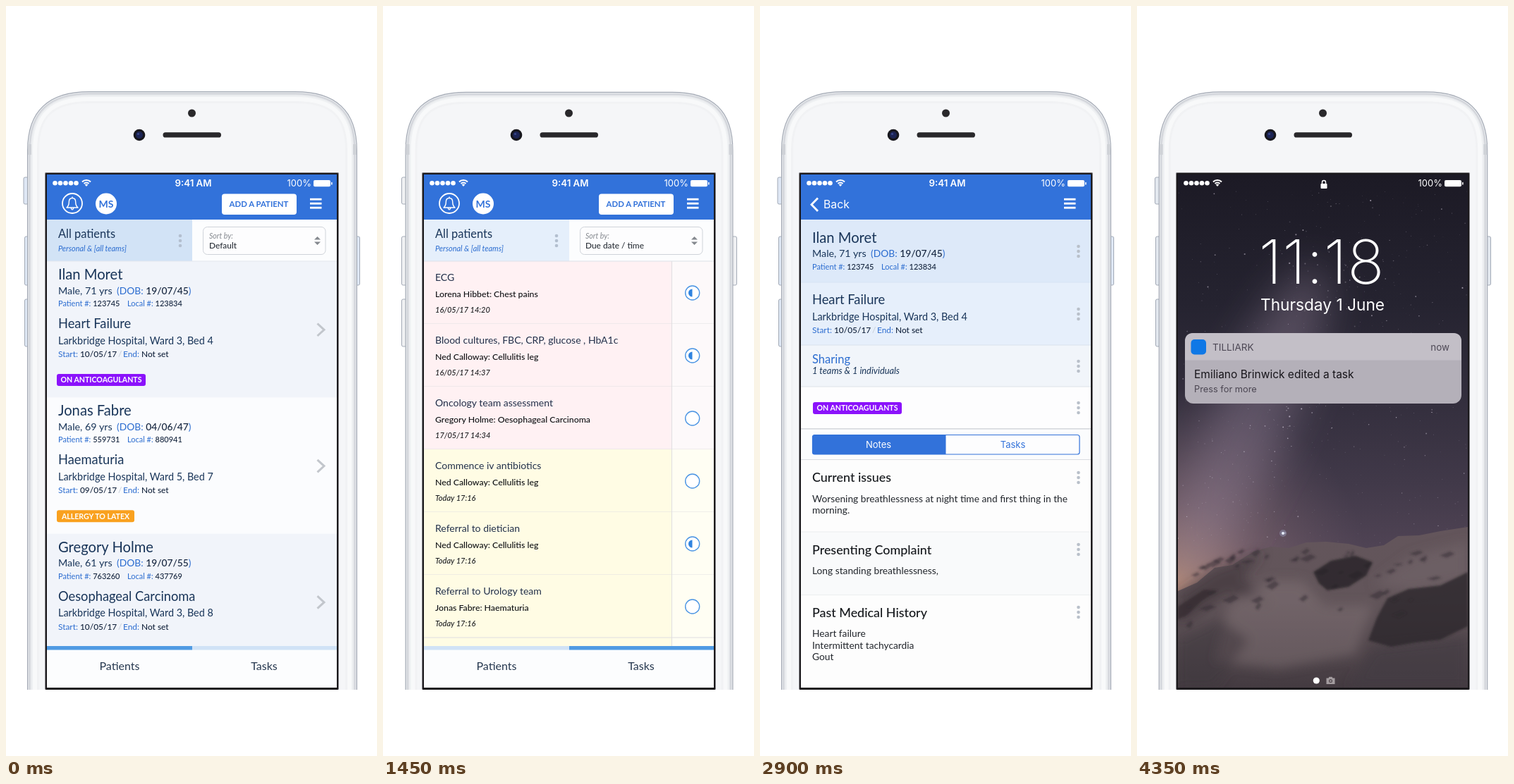
An HTML page that plays this animation: 526x1064 px, repeating every 5800 ms.

```html
<!DOCTYPE html>
<html lang="en">
<head>
<meta charset="utf-8">
<style>
html, body { margin: 0; width: 100%; height: 100%; overflow: hidden; background: #fff; }
svg { display: block; width: 526px; height: 1064px; font-family: Lato, "Open Sans", sans-serif; white-space: pre; }
.ui { font-family: Inter, Roboto, sans-serif; }
.it { font-style: italic; }
</style>
</head>
<body>
<svg id="stage" viewBox="0 0 526 1064"></svg>
<script>
const BLUE = '#3272da', NAVY = '#193559', INK = '#22262c', LINK = '#2c6dd0', SKY = '#4a94e3';
const STEP = 1450;

// Drawing helpers, each returning SVG markup
const rect = (x, y, w, h, fill, more = '') => `<rect x="${x}" y="${y}" width="${w}" height="${h}" fill="${fill}" ${more}/>`;
const dot = (x, y, r, fill, more = '') => `<circle cx="${x}" cy="${y}" r="${r}" fill="${fill}" ${more}/>`;
const path = (d, fill, more = '') => `<path d="${d}" fill="${fill}" ${more}/>`;
const line = (d, stroke, width, more = '') => path(d, 'none', `stroke="${stroke}" stroke-width="${width}" ${more}`);
const text = (x, y, size, fill, str, more = '') => `<text x="${x}" y="${y}" font-size="${size}" fill="${fill}" ${more}>${str}</text>`;
const group = (x, y, body) => `<g transform="translate(${x} ${y})">${body}</g>`;
const value = str => `<tspan fill="#14243d" font-weight="500">${str}</tspan>`;
const mid = 'text-anchor="middle"', bold = 'font-weight="700"', medium = 'font-weight="500"', ui = 'class="ui"', it = 'class="it"';
const more = (x, y, fill = '#b9c0ca') => [-7, 0, 7].map(d => dot(x, y + d, 2.3, fill)).join('');
const rule = (y, fill = '#dde1e8') => rect(58, y, 411, 1, fill);

function random(seed) {
  return () => (seed = seed * 16807 % 2147483647) / 2147483647;
}

function phone(inset, buttonX, tint) {
  const shell = i => {
    const l = 30 + inset + i, r = 498 - inset - i, t = 121 + inset / 2 + i;
    return `M${l} 970V205C${l} ${148 + i / 2} ${60 + i / 2} ${t} 118 ${t}H410C${468 - i / 2} ${t} ${r} ${148 + i / 2} ${r} 205V970Z`;
  };
  const button = (x, y, h) => rect(x, y, 9, h, tint, 'rx="2" stroke="#9aa2af" stroke-width=".9"');
  const shades = [[0, '#a3a9b4'], [1.2, '#e9ebee'], [2.5, '#cfd2d8'], [4, '#dfe1e5'], [5.5, '#eef0f2'], [8, '#f8f9fa'], [14, '#f1f2f4'], [17, '#f5f6f8']];
  return button(buttonX, 243, 38) + button(26.5, 327, 69) + button(26.5, 416, 67) + button(492.5, 327, 69)
    + shades.map(([i, fill]) => path(shell(i), fill)).join('')
    + rect(31 + inset, 196, 5, 15, '#cfd2d7') + rect(492 - inset, 196, 5, 15, '#cfd2d7')
    + dot(263.5, 152, 5.5, '#29282b')
    + dot(189, 183, 8.3, '#17171d') + dot(189, 183, 5, '#1c2455') + dot(187.5, 181.5, 1.6, '#39488b')
    + rect(222.5, 179.3, 82.5, 7.2, '#29282b', 'rx="3.6"')
    + rect(55, 236, 417, 734, '#8b8a8e', 'rx="1.5"') + rect(56, 237, 415, 733, '#1b191c', 'rx="1"');
}

function statusBar() {
  const arc = r => line(`M${114 - r * .72} ${255.5 - r * .72}A${r} ${r} 0 0 1 ${114 + r * .72} ${255.5 - r * .72}`, '#fff', 2);
  return [0, 1, 2, 3, 4].map(i => dot(69.5 + i * 7.5, 251.3, 3.3, '#fff')).join('')
    + arc(8.4) + arc(4.8) + path('M111.7 253.5L114 256L116.3 253.5Q114 251.5 111.7 253.5Z', '#fff')
    + text(433, 256, 13, '#fff', '100%', 'class="ui" text-anchor="end"')
    + rect(436, 247, 24, 9.3, '#fff', 'rx="2"') + rect(461, 249.7, 1.6, 4, '#fff', 'rx=".8"');
}

function header() {
  return rect(58, 239, 411, 64, BLUE) + statusBar()
    + text(265.5, 256, 13.3, '#fff', '9:41 AM', `${ui} ${mid} font-weight="600"`)
    + [0, 1, 2].map(i => rect(431, 272.8 + i * 6, 16.5, 2.8, '#fff')).join('');
}

function homeHeader() {
  return header()
    + dot(94, 280, 14, 'none', 'stroke="#fff" stroke-width="1.8"')
    + line('M86 286Q89.3 283.5 89.3 278Q89.3 272.5 94 272.5Q98.7 272.5 98.7 278Q98.7 283.5 102 286ZM94 272.5V270.5M92 286.5Q94 291 96 286.5', '#fff', 1.4, 'stroke-linejoin="round"')
    + dot(142, 280.5, 15, '#fff') + text(142, 286, 14, BLUE, 'MS', `${mid} ${bold}`)
    + rect(306, 266.5, 106, 29.5, '#fff', 'rx="4"')
    + text(358.5, 285, 11.4, BLUE, 'ADD A PATIENT', `${mid} ${bold}`);
}

function filterBar(tint, sort, x) {
  return rect(58, 303, 411, 59, '#fcfdfe') + rect(58, 303, 206, 59, tint)
    + text(74, 329, 16.4, NAVY, 'All patients')
    + text(74, 348, 10.9, LINK, 'Personal &amp; [all teams]', it)
    + more(x - 41, 333, '#b3bfcf')
    + rect(279.5, 313.5, 173.5, 39, '#fdfdfe', 'rx="6" stroke="#cfd3d9"')
    + text(x, 330, 10.6, '#85898f', 'Sort by:', it) + text(x, 344, 11.9, '#2b3139', sort, medium)
    + path('M437 331.5L441.5 327L446 331.5ZM437 334.5L441.5 339L446 334.5Z', '#85898f');
}

function tabs(left, right) {
  return rect(58, 908, 411, 59, '#fcfdfe') + rect(58, 908, 206, 5.5, left) + rect(264, 908, 205, 5.5, right)
    + text(161, 942, 16, '#26384f', 'Patients', mid) + text(366, 942, 16, '#26384f', 'Tasks', mid);
}

function badge(x, y, w, fill, label) {
  return rect(x, y, w, 17, fill, 'rx="3"') + text(x + w / 2, y + 12.3, 10.6, '#fff', label, `${mid} ${bold}`);
}

// Text blocks shared by the list and the detail screen
function person(y, name, age, born, id, local) {
  return text(74, y, 20.2, NAVY, name)
    + text(74, y + 20.5, 14.3, NAVY, `Male, ${age} yrs`)
    + text(157, y + 20.5, 13.8, LINK, `(DOB: ${value(born)})`)
    + text(74, y + 38, 11, LINK, `Patient #: ${value(id)}`)
    + text(172, y + 38, 11, LINK, `Local #: ${value(local)}`);
}

function stay(y, illness, ward, bed, start) {
  return text(74, y, 18.3, NAVY, illness)
    + text(74, y + 22.5, 14.4, NAVY, `Larkbridge Hospital, Ward ${ward}, Bed ${bed}`)
    + text(74, y + 41, 11.9, LINK, `Start: ${value(start)}`)
    + text(159, y + 41, 12, '#c2cad6', '/')
    + text(166, y + 41, 11.9, LINK, `End: ${value('Not set')}`);
}

function patientList() {
  const rows = [
    ['#f1f4fa', ['Ilan Moret', 71, '19/07/45', 123745, 123834], ['Heart Failure', 3, 4, '10/05/17'], [126, '#8b12fb', 'ON ANTICOAGULANTS']],
    ['#fbfcfe', ['Jonas Fabre', 69, '04/06/47', 559731, 880941], ['Haematuria', 5, 7, '09/05/17'], [110, '#f9a11f', 'ALLERGY TO LATEX']],
    ['#f1f4fa', ['Gregory Holme', 61, '19/07/55', 763260, 437769], ['Oesophageal Carcinoma', 3, 8, '10/05/17']]
  ];
  return rows.map(([fill, who, why, tag], i) => group(0, i * 193.3,
    rect(58, 362, 411, 194, fill) + person(388, ...who) + stay(457, ...why)
    + line('M441.5 450.5L451 459.3L441.5 468', '#c2c6cc', 3) + (tag ? badge(72, 522, ...tag) : ''))).join('')
    + homeHeader() + filterBar('#d2e3f6', 'Default', 288) + rule(361.5, '#e3e8ef') + tabs('#4f9ae3', '#d0e2f6');
}

function taskList() {
  const leg = 'Ned Calloway: Cellulitis leg';
  const rows = [
    ['ECG', 'Lorena Hibbet: Chest pains', '16/05/17 14:20', 1],
    ['Blood cultures, FBC, CRP, glucose , HbA1c', leg, '16/05/17 14:37', 1],
    ['Oncology team assessment', 'Gregory Holme: Oesophageal Carcinoma', '17/05/17 14:34', 0],
    ['Commence iv antibiotics', leg, 'Today 17:16', 0],
    ['Referral to dietician', leg, 'Today 17:16', 1],
    ['Referral to Urology team', 'Jonas Fabre: Haematuria', 'Today 17:16', 0]
  ];
  return rect(58, 896, 351, 12, '#fffce4') + rect(409, 896, 60, 12, '#fffef3')
    + rows.map(([title, who, due, half], i) => group(0, i * 89,
      rect(58, 362, 351, 89, i < 3 ? '#fff1f3' : '#fffce4') + rect(409, 362, 60, 89, i < 3 ? '#fdf9fa' : '#fffef3')
      + rule(450.5, '#e0dfe2')
      + text(74, 390, 14, '#22304a', title)
      + text(74, 413, 12.3, '#101215', who, medium)
      + text(74, 435, 11, '#1d1f22', due, `${it} ${medium}`)
      + dot(438.7, 407, 10, '#fff', `stroke="${SKY}" stroke-width="1.4"`)
      + (half ? path('M438.5 401.5A5.5 5.5 0 0 0 438.5 412.5Z', '#2f83e0') : ''))).join('')
    + rect(409, 362, 1, 546, '#dfdfe2')
    + homeHeader() + filterBar('#e5effb', 'Due date / time', 287) + rule(361.5) + tabs('#d0e2f6', '#4f9ae3');
}

function detail() {
  const bands = [[303, '#dde9f9'], [392, '#e6effb'], [481, '#f1f5fa'], [540, '#fdfdfe'], [600, '#fbfcfd'], [643, '#fdfdfd'], [746, '#f9fafb'], [835, '#fdfdfd']];
  const notes = [
    [675, 'Current issues', ['Worsening breathlessness at night time and first thing in the', 'morning.']],
    [777.5, 'Presenting Complaint', ['Long standing breathlessness,']],
    [866.5, 'Past Medical History', ['Heart failure', 'Intermittent tachycardia', 'Gout']]
  ];
  return bands.map(([y, fill]) => rect(58, y, 411, 967 - y, fill)).join('')
    + rule(391.5, '#d7e3f3') + rule(480.5, '#d9e2ee') + rule(539.5, '#dde3ea')
    + rect(58, 599, 411, 1.6, '#d6d9de') + rule(643, '#dadde1') + rule(745.5, '#eceef0') + rule(835, '#eceef0')
    + header()
    + line('M82 272.5L73 281.7L82 291', '#fff', 2.8) + text(90, 287, 15.8, '#fff', 'Back', ui)
    + person(335.5, 'Ilan Moret', 71, '19/07/45', 123745, 123834)
    + stay(423, 'Heart Failure', 3, 4, '10/05/17')
    + text(74, 506.5, 16.5, LINK, 'Sharing')
    + text(74, 521.5, 12.8, NAVY, '1 teams &amp; 1 individuals', it)
    + badge(75, 562, 126, '#8b12fb', 'ON ANTICOAGULANTS')
    + rect(74.5, 608.5, 378.5, 27.5, '#fdfdfe', `rx="3" stroke="${BLUE}" stroke-width="1.2"`)
    + path('M77 608.5H263.5V636H77Q74.5 636 74.5 633V611Q74.5 608.5 77 608.5Z', BLUE)
    + text(168, 627, 13, '#fff', 'Notes', `${ui} ${mid}`) + text(358.5, 627, 13, BLUE, 'Tasks', `${ui} ${mid}`)
    + notes.map(([y, title, body]) => text(74, y, 17.9, '#15181c', title, medium)
      + body.map((str, i) => text(74, y + 28.5 + i * 16.7, 13.75, INK, str)).join('')).join('')
    + [348, 437, 511, 570, 669, 771, 860].map(y => more(451.5, y)).join('');
}

function wallpaper() {
  const rnd = random(77);
  let stars = '', flecks = '';
  for (let i = 0; i < 600; i++) {
    const y = 262 + rnd() * 500;
    // Half of the stars gather along the bright band
    const x = i % 2 ? 58 + rnd() * 411 : 350 - (y - 262) * .45 + (rnd() + rnd() - 1) * 150;
    stars += dot(x.toFixed(1), y.toFixed(1), (.35 + rnd() ** 5 * .8).toFixed(2), '#d9d0e0', `opacity="${(.2 + rnd() * .5).toFixed(2)}"`);
  }
  for (let i = 0; i < 50; i++) {
    const x = 65 + rnd() * 395, y = 775 + rnd() ** 2 * 90 + Math.max(0, 130 - x) * .5;
    const w = 4 + rnd() * 12, h = 2 + rnd() * 6;
    flecks += path(`M${x} ${y}l${w} ${-h}l${w * .5} ${h * .6}l${-w * .8} ${h}z`, '#30292f', 'opacity=".5"');
  }
  return rect(58, 239, 411, 728, 'url(#sky)') + rect(58, 239, 411, 728, 'url(#glow)')
    + `<g filter="url(#soft)"><ellipse cx="155" cy="600" rx="55" ry="250" fill="#93839a" opacity=".42" transform="rotate(24 155 600)"/></g>`
    + stars + dot(207, 748, 5, '#a9b4d6', 'opacity=".35"') + dot(207, 748, 2, '#e8efff')
    + path('M58 830L85 818L110 797L135 793L165 774L190 767L215 769L240 761L268 760L300 763L325 769L350 765L370 752L400 751L430 745L469 739V967H58Z', 'url(#snow)')
    + `<g filter="url(#haze)">`
    + path('M58 835L110 800L180 775L150 810L190 850L130 835L58 880Z', '#3d343a', 'opacity=".6"')
    + path('M130 850L190 815L235 815L265 850L335 850L310 920L200 940L110 930Z', '#85757b', 'opacity=".45"')
    + path('M335 820L390 780L469 760V815L390 830Z', '#74666b', 'opacity=".6"')
    + path('M58 900L120 870L160 900L110 967H58Z', '#3f363d', 'opacity=".5"')
    + path('M300 967L335 910L469 895V967Z', '#443b42', 'opacity=".7"') + '</g>'
    + `<g filter="url(#rough)">` + flecks
    + path('M250 803L275 787L310 780L334 789L325 808L300 824L270 829L258 819Z', '#2a2429', 'opacity=".85"')
    + path('M340 868L355 840L385 827L430 822L469 803V880L430 899L395 903L360 909L328 900Z', '#2d272c', 'opacity=".8"')
    + path('M58 852L95 828L115 829L92 844L70 865L58 870Z', '#332b31', 'opacity=".7"') + '</g>';
}

function lockScreen() {
  return wallpaper() + statusBar()
    + rect(260.5, 252, 9, 7, '#fff', 'rx="1"') + line('M262.5 252.5V250Q262.5 247.5 265 247.5Q267.5 247.5 267.5 250V252.5', '#fff', 1.4)
    + text(262, 393.5, 86.5, '#fff', '11:18', `${ui} ${mid} font-weight="200" letter-spacing=".8"`)
    + text(263, 432, 22.7, '#fff', 'Thursday 1 June', `${ui} ${mid}`)
    + rect(68, 464, 392, 100, '#b4b0b9', 'rx="12"')
    + path('M68 502.5V476Q68 464 80 464H448Q460 464 460 476V502.5Z', '#c3bfc7')
    + rect(76.5, 473, 21.5, 21.5, '#0f78e6', 'rx="5"')
    + text(107, 489, 13.6, '#4d4855', 'TILLIARK', ui)
    + text(443, 489, 13.4, '#4d4855', 'now', 'class="ui" text-anchor="end"')
    + text(81, 528, 15.5, '#17151a', 'Emiliano Brinwick edited a task', ui)
    + text(81, 548, 12.8, '#4b4652', 'Press for more', ui)
    + dot(254.3, 957, 4.6, '#fff')
    + path('M268.5 953.5H271.5L272.5 951.8H276.5L277.5 953.5H280.5V962H268.5Z', '#a39c9f')
    + dot(274.5, 957.5, 2.5, '#51474c') + dot(274.5, 957.5, 1.3, '#a39c9f');
}

const stops = list => list.map(([at, fill, alpha = 1]) => `<stop offset="${at}" stop-color="${fill}" stop-opacity="${alpha}"/>`).join('');
const defs = `<defs>
  <clipPath id="crop"><rect width="526" height="970"/></clipPath>
  <clipPath id="glass"><rect x="58" y="239" width="411" height="728"/></clipPath>
  <linearGradient id="sky" x2="0" y2="1">${stops([[0, '#1c1a25'], [.25, '#252330'], [.45, '#342f3e'], [.6, '#413949'], [.75, '#524556']])}</linearGradient>
  <radialGradient id="glow" gradientUnits="userSpaceOnUse" cx="58" cy="815" r="270">${stops([[0, '#b98d75', .9], [.4, '#8d7075', .55], [1, '#6d5a68', 0]])}</radialGradient>
  <linearGradient id="snow" x2="0" y2="1">${stops([[0, '#63555b'], [.45, '#62555a'], [1, '#443b41']])}</linearGradient>
  <filter id="soft" x="-150%" y="-30%" width="400%" height="160%"><feGaussianBlur stdDeviation="28"/></filter>
  <filter id="haze"><feGaussianBlur stdDeviation="8"/></filter>
  <filter id="rough"><feGaussianBlur stdDeviation="1.8"/></filter>
</defs>`;

const scenes = [
  [patientList, 0, 25, '#dfe8f5'],
  [taskList, 1.5, 26.5, '#f0f1f3'],
  [detail, 0, 25, '#dfe8f5'],
  [lockScreen, .7, 25.5, '#e3e8ef']
];
const stage = document.getElementById('stage');
stage.innerHTML = defs + scenes.map(([screen, ...look]) =>
  `<g class="scene" clip-path="url(#crop)">${phone(...look)}<g clip-path="url(#glass)">${screen()}</g></g>`).join('');
const layers = stage.querySelectorAll('.scene');

function tick() {
  const now = Math.floor(performance.now() / STEP) % layers.length;
  layers.forEach((layer, i) => layer.style.display = i === now ? '' : 'none');
  requestAnimationFrame(tick);
}
tick();
</script>
</body>
</html>
```
